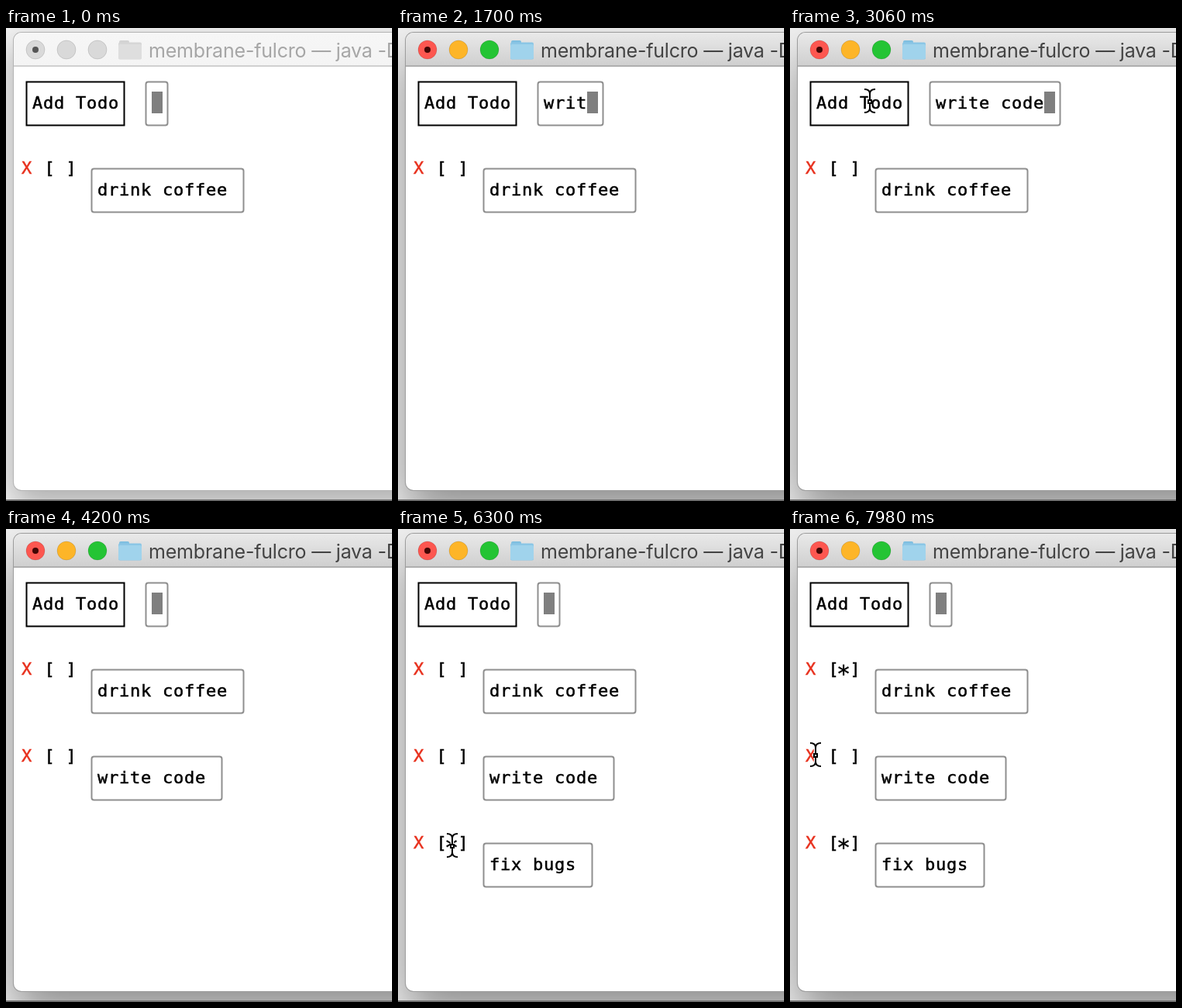
Write an HTML page with a canvas that moves like this. It is 498 by 610 pixels and loops after 8 s.

```html
<!DOCTYPE html>
<html lang="en">
<head>
<meta charset="utf-8">
<title>Todo terminal</title>
<style>
  html, body { margin: 0; width: 100%; height: 100%; overflow: hidden; }
  canvas { display: block; }
</style>
</head>
<body>
<canvas id="stage" width="498" height="610"></canvas>
<script>
const ctx = document.getElementById('stage').getContext('2d');
const LOOP = 8000, CELL = 14, ROW = 28, ACTIVATE = 660;
const GRAY = '#8f8f8f';

// Typed from start to end, added by a click, later perhaps ticked off
const todos = [
  { text: 'drink coffee', added: 0, done: 7120 },
  { text: 'write code', start: 1420, end: 2120, added: 3100 },
  { text: 'fix bugs', start: 4220, end: 5020, added: 5720, done: 6300 },
];

// Pointer stops; travel is the time spent getting there, bulge bends the path
const stops = [
  { at: 280, travel: 0, x: 500, y: 72 },
  { at: 620, travel: 340, x: 392, y: 39, bulge: 8 },
  { at: 2400, travel: 0, x: 347, y: 18 },
  { at: 3020, travel: 520, x: 103, y: 94, bulge: 35 },
  { at: 6160, travel: 420, x: 70, y: 408, bulge: -20 },
  { at: 7000, travel: 680, x: 80, y: 178, bulge: 58 },
  { at: 7560, travel: 420, x: 125, y: 308, bulge: -30 },
  { at: 7970, travel: 270, x: 33, y: 291, bulge: -8 },
];

function fillRound(x, y, w, h, r, color) {
  ctx.beginPath();
  ctx.roundRect(x, y, w, h, r);
  ctx.fillStyle = color;
  ctx.fill();
}

function mono(text, x, baseline, color = '#000', size = 22) {
  ctx.font = `${size}px "DejaVu Sans Mono", monospace`;
  ctx.letterSpacing = '0.756px';
  ctx.fillStyle = ctx.strokeStyle = color;
  ctx.lineWidth = 0.5;
  ctx.fillText(text, x, baseline);
  ctx.strokeText(text, x, baseline);
}

function box(x, y, cells, color, radius) {
  ctx.beginPath();
  ctx.roundRect(x - 0.5, y - 0.5, (cells + 1) * CELL, 2 * ROW, radius);
  ctx.strokeStyle = color;
  ctx.lineWidth = 2;
  ctx.stroke();
}

function drawTitleBar(active) {
  const bar = ctx.createLinearGradient(0, 6, 0, 49);
  bar.addColorStop(0, active ? '#e9e9e9' : '#f6f6f6');
  bar.addColorStop(1, active ? '#cfcfcf' : '#f4f4f4');
  fillRound(10, 6, 700, 43, [10, 10, 0, 0], bar);
  fillRound(10, 48, 490, 2, 0, active ? '#afafaf' : '#d0d0d0');

  ['#fd5750', '#fdb528', '#24c434'].forEach((color, i) => {
    const x = 38 + 40 * i;
    fillRound(x - 12, 16, 24, 24, 12, active ? color : '#d9d9d9');
    ctx.strokeStyle = 'rgba(0,0,0,.12)';
    ctx.lineWidth = 1;
    ctx.stroke();
  });
  fillRound(34, 24, 8, 8, 4, active ? '#430604' : '#555');

  fillRound(146, 16, 13, 8, 2, active ? '#7fbfe0' : '#d3d3d3');
  fillRound(145, 18.5, 30, 22, 2, active ? '#8bc6e5' : '#d6d6d6');
  fillRound(145, 21, 30, 19, 2, active ? '#a0d3ec' : '#dedede');

  ctx.font = '25px Inter, sans-serif';
  ctx.letterSpacing = '-0.2px';
  ctx.fillStyle = active ? '#434343' : '#a6a6a6';
  ctx.fillText('membrane-fulcro — java -D', 184, 38);
}

function drawWindow(active) {
  fillRound(0, 0, 498, 610, 0, '#f3f3f3');
  ctx.save();
  ctx.shadowColor = active ? 'rgba(0,0,0,.42)' : 'rgba(0,0,0,.3)';
  ctx.shadowBlur = active ? 60 : 40;
  ctx.shadowOffsetY = active ? 28 : 16;
  fillRound(9, 5, 702, 592, 11, active ? '#9c9c9c' : '#b4b4b4');
  ctx.restore();
  fillRound(10, 6, 700, 590, 10, '#fff');
  fillRound(0, 608, 498, 2, 0, '#707070');
  drawTitleBar(active);
}

function drawInput(t) {
  const draft = todos.find(d => t >= d.start && t < d.added);
  let text = '';
  if (draft) {
    const progress = Math.min(1, (t - draft.start) / (draft.end - draft.start));
    text = draft.text.slice(0, 1 + Math.floor(progress * (draft.text.length - 1)));
  }
  box(181, 70, text.length + 1, GRAY, 3);
  mono(text, 188, 104);
  fillRound(188 + text.length * CELL, 82, CELL, ROW, 0, '#7f7f7f');
}

function drawTodo({ text, added, done }, i, t) {
  if (t < added) return;
  const y = 188 + i * 4 * ROW;
  mono('X', 20, y, '#e8321f');
  mono('[ ]', 49.5, y);
  if (t >= done) mono('∗', 60, y + 3, '#000', 30);
  box(111, y - 6, text.length + 1, GRAY, 3);
  mono(text, 118, y + ROW);
}

function pointerAt(t) {
  const next = stops.findIndex(s => t < s.at);
  if (next < 0) return stops.at(-1);
  const from = stops[next - 1], to = stops[next];
  if (t < to.at - to.travel || !to.travel) return from;
  const p = 1 - (to.at - t) / to.travel;
  const e = p * p * (3 - 2 * p);
  const dx = to.x - from.x, dy = to.y - from.y;
  const bend = to.bulge * Math.sin(Math.PI * e) / Math.hypot(dx, dy);
  return { x: from.x + dx * e - dy * bend, y: from.y + dy * e + dx * bend };
}

// The pointer hides while keys are pressed, until it moves again
function pointerShown(t) {
  return t >= 280 && !(t >= 1400 && t < 2400) && !(t >= 4200 && t < 5440);
}

const arrow = new Path2D('M0 0V28L6.5 22L11 32L15.5 30L11 20.5H19.5Z');
const beam = new Path2D('M-7 -15Q0 -15 0 -9V9Q0 15 -7 15M7 -15Q0 -15 0 -9M7 15Q0 15 0 9');

function drawPointer(t) {
  const { x, y } = pointerAt(t);
  ctx.save();
  ctx.translate(x, y);
  ctx.strokeStyle = '#fff';
  if (y < 50 || t < 1400) {
    ctx.shadowColor = 'rgba(0,0,0,.4)';
    ctx.shadowBlur = 5;
    ctx.shadowOffsetY = 2;
    ctx.lineWidth = 3;
    ctx.stroke(arrow);
    ctx.shadowColor = 'transparent';
    ctx.fillStyle = '#000';
    ctx.fill(arrow);
  } else {
    ctx.lineWidth = 4.5;
    ctx.stroke(beam);
    ctx.strokeStyle = '#000';
    ctx.lineWidth = 2;
    ctx.stroke(beam);
    fillRound(-3, -2, 6, 6, 0, '#000');
    fillRound(-1, 0, 2, 2, 0, '#fff');
  }
  ctx.restore();
}

function draw() {
  const t = performance.now() % LOOP;
  drawWindow(t >= ACTIVATE);
  box(27, 70, 8, '#000', 0);
  mono('Add Todo', 34, 104);
  drawInput(t);
  todos.forEach((todo, i) => drawTodo(todo, i, t));
  if (pointerShown(t)) drawPointer(t);
  requestAnimationFrame(draw);
}
draw();
</script>
</body>
</html>
```
